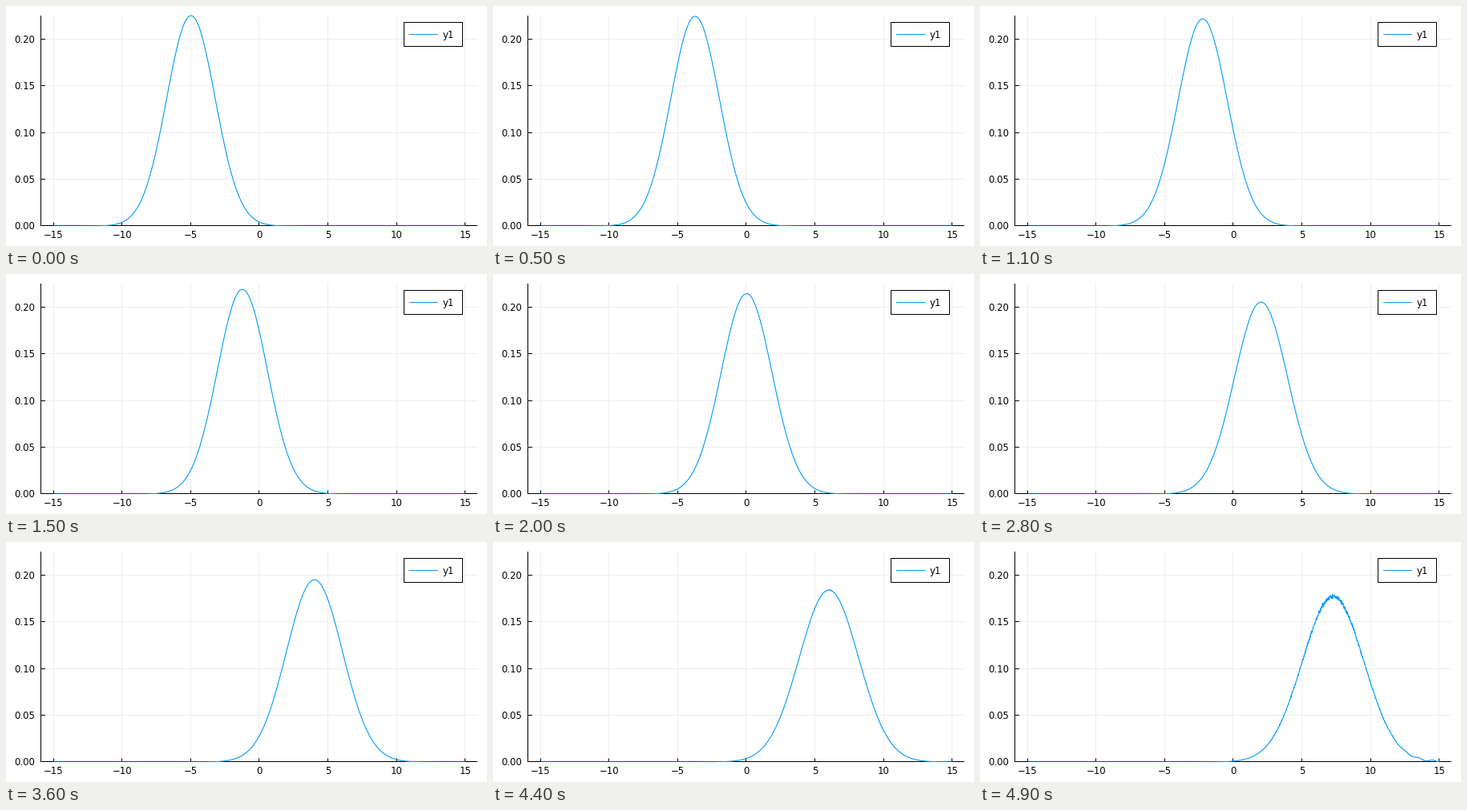
A matplotlib script for the animation above (5 s loop, 600 by 300 pixels).

```python
import numpy as np
import matplotlib.pyplot as plt
from matplotlib.animation import FuncAnimation
from matplotlib.patches import Rectangle

W, H, DPI = 600, 300, 100
FRAMES, INTERVAL = 50, 100
LEFT, RIGHT, TOP, BOTTOM = 43.5, 588, 12, 274.5
BLUE, GRID = "#009afa", "#eeeeee"
PT = 72 / DPI

START, SPEED, WIDTH2, WALL = -5.0, 2.5, 6.25, 15.0

plt.rcParams["font.family"] = "DejaVu Sans"
plt.rcParams["path.simplify"] = False


def px(x):
    return 315.8 + 17.12 * x


def py(y):
    return BOTTOM - 1165 * y


def crisp(v):
    """Centre of the pixel that holds v."""
    return np.floor(v) + 0.5


def packet(x, t):
    """Freely spreading Gaussian wave packet."""
    spread = 1 + 1j * t / WIDTH2
    amp = (np.pi * WIDTH2) ** -0.25 / np.sqrt(spread)
    return amp * np.exp(-(x - START - SPEED * t) ** 2 / (2 * WIDTH2 * spread) + 1j * SPEED * x)


def density(frame):
    t = 0.1 * frame
    # The mirrored packet makes the wave vanish at the right wall.
    rho = np.abs(packet(xs, t) - packet(2 * WALL - xs, t)) ** 2
    # Rounding errors of the solver grow exponentially towards the end.
    jitter = 0.006 * 0.65 ** (FRAMES - 1 - frame)
    rng = np.random.default_rng(frame)
    return rho * (1 + jitter * rng.standard_normal(xs.size))


fig = plt.figure(figsize=(W / DPI, H / DPI), dpi=DPI, facecolor="white")
ax = fig.add_axes([0, 0, 1, 1])
ax.set_xlim(0, W)
ax.set_ylim(H, 0)
ax.axis("off")


def line(x, y, color="black", width=1.0, z=2):
    return ax.plot(x, y, color=color, lw=width * PT, zorder=z, snap=False,
                   solid_capstyle="butt")[0]


def label(x, y, text, align):
    ax.text(x, y, text, fontsize=8.4, ha=align, va="baseline", zorder=6)


for v in range(-15, 16, 5):
    x = crisp(px(v))
    line([x, x], [TOP, BOTTOM], GRID, 1, 1)
    line([x, x], [BOTTOM, BOTTOM - 4])
    label(px(v), 290, str(v).replace("-", "\u2212"), "center")

for k in range(5):
    y = crisp(py(0.05 * k))
    line([LEFT, RIGHT], [y, y], GRID, 1, 1)
    line([LEFT, LEFT + 5.5], [y, y])
    label(36, y + 4.2, f"{0.05 * k:.2f}", "right")

line([LEFT, LEFT], [TOP, BOTTOM + 0.5])
line([LEFT - 0.5, RIGHT], [BOTTOM, BOTTOM])

ax.add_patch(Rectangle((496.5, 20.5), 73, 30, fc="white", ec="black", lw=PT,
                       zorder=4, snap=False))
line([503, 539], [35.5, 35.5], BLUE, 1, 5)
label(545, 40, "y1", "left")

# Curve points sit half a pixel off the grid lines.
xs = np.linspace(-WALL, WALL, 2001)
curve = line(px(xs) + 0.5, py(density(0)) + 0.5, BLUE, 1.1, 3)
curve.set_clip_path(Rectangle((LEFT, 11), RIGHT - LEFT, 264, transform=ax.transData))


def update(frame):
    curve.set_ydata(py(density(frame)) + 0.5)
    return (curve,)


anim = FuncAnimation(fig, update, frames=FRAMES, interval=INTERVAL, repeat=True, repeat_delay=0)
plt.show()
```
